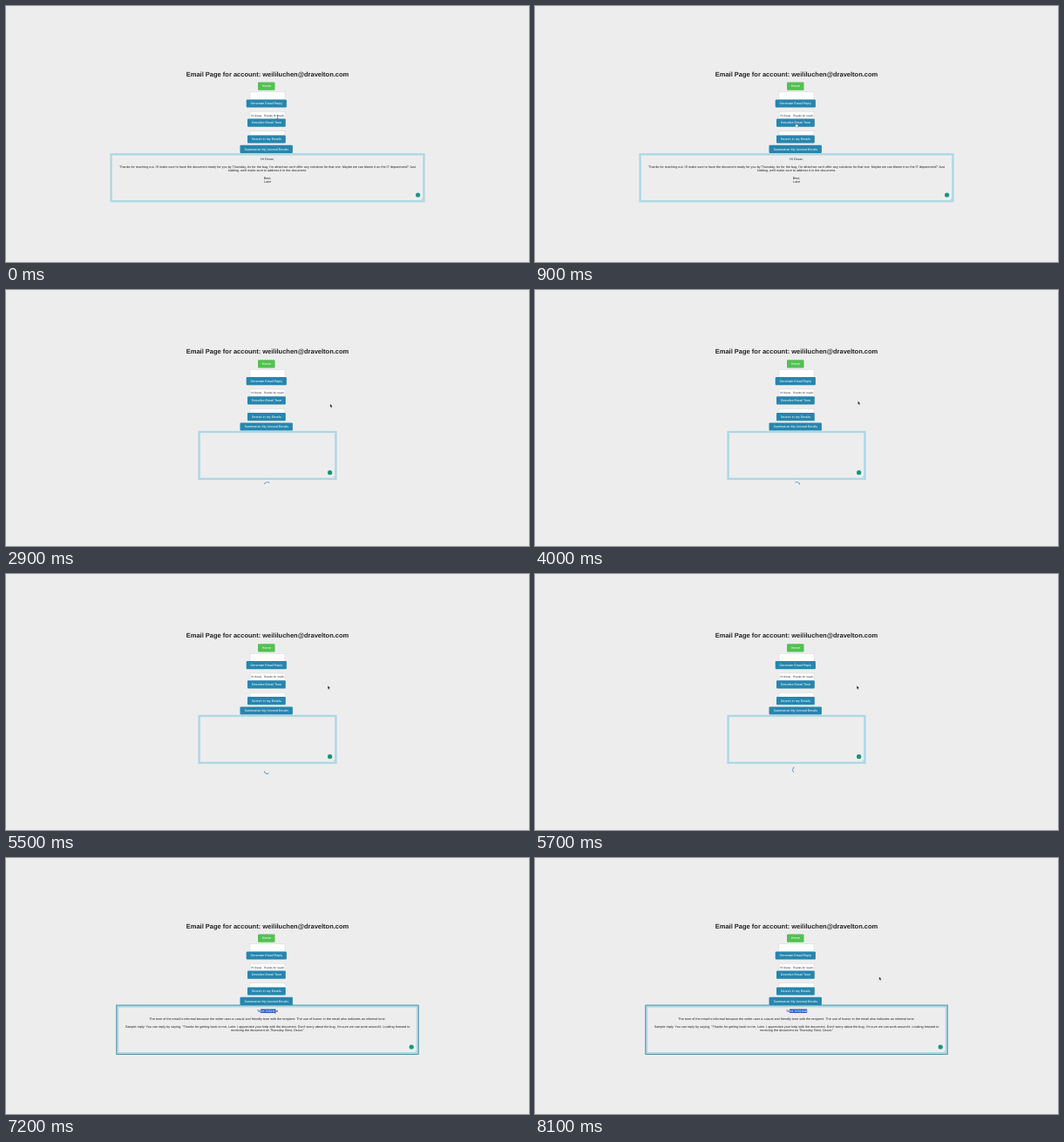
Animation, 600 px wide and 294 px high, one loop 8200 ms. Source, as an HTML page:

```html
<!DOCTYPE html>
<html lang="en">
<head>
<meta charset="utf-8">
<title>Email page</title>
<style>
  html, body { margin: 0; width: 100%; height: 100%; overflow: hidden; background: #eeedee; }
  svg { display: block; width: 100%; height: 100%; }
  text { font: 3.75px Arial, "Liberation Sans", sans-serif; text-anchor: middle; fill: #222;
         text-rendering: geometricPrecision; white-space: pre; }
  .title { font-size: 7.5px; font-weight: bold; }
  .label, .picked text { fill: #fff; }
  .typed { font-size: 3.125px; text-anchor: start; }
  .input { fill: #fff; stroke: #c4c4c4; stroke-width: .3; }
</style>
</head>
<body>
<svg viewBox="0 0 600 294">
  <defs>
    <clipPath id="pick"><rect id="range" x="291.9" y="173.5" width="0" height="4.5"/></clipPath>
  </defs>
  <g id="page">
    <text class="title" x="300" y="80.7">Email Page for account: weililuchen@dravelton.com</text>
    <g id="form"></g>
    <rect id="box" y="170.3" height="53.9" fill="none" stroke="#add8e3" stroke-width="2.4"/>
    <rect id="focus" y="169" height="56.4" fill="none" stroke="#2f819c" stroke-width=".8"/>
    <g id="corner">
      <circle cx="-8" cy="217" r="2.6" fill="#16967f"/>
      <path d="M-4 222.6l1.5-1.5M-3.1 222.6l.6-.6" stroke="#777" stroke-width=".3"/>
    </g>
    <g id="email"></g>
    <g id="tone"></g>
    <g class="picked" clip-path="url(#pick)">
      <rect x="280" y="170" width="40" height="10" fill="#2b62c4"/>
      <text x="300" y="177">Tone: Informal</text>
    </g>
  </g>
  <path id="spinner" d="M-3 -3A4.25 4.25 0 0 1 3 -3" fill="none" stroke="#3399bd" stroke-width="1"/>
  <g id="arrow"><path d="M0 0V3.9L.9 3.1L1.5 4.4L2.2 4.1L1.6 2.8H2.8Z" fill="#111" stroke="#fff" stroke-width=".25"/></g>
  <g id="beam"><path d="M-.8 -2H.8M0 -2V2M-.8 2H.8" fill="none" stroke="#333" stroke-width=".45"/></g>
  <g id="hand"><path d="M-.4 0Q0 -.5 .4 0V1.5L2 1.9Q2.5 2.1 2.4 2.8L2 4.3H-.3L-1.5 2.6Q-1.3 2 -.4 2.6Z" fill="#fff" stroke="#222" stroke-width=".3"/></g>
</svg>
<script>
const $ = id => document.getElementById(id);
const LOOP = 8200, STEP = 100, CLICK = 1200, REPLY = 6000, DRAG = 6900, DROP = 7300;

const input = (y, h) => `<rect class="input" x="280" y="${y}" width="40" height="${h}"/>`;
const button = (x, y, w, label, fill = "#2686ae") =>
  `<rect x="${x}" y="${y}" width="${w}" height="9.2" rx="1" fill="${fill}"/>
   <text class="label" x="${x + w / 2}" y="${y + 5.9}">${label}</text>`;
const lines = rows => rows.map((row, i) => `<text x="300" y="${177 + i * 4.38}">${row}</text>`).join("");

$("form").innerHTML =
  button(289, 87.5, 19.5, "Home", "#52c152") +
  input(98.8, 8.6) + button(275.7, 107.4, 46.2, "Generate Email Reply") +
  input(121.3, 8.2) + '<text class="typed" x="281.2" y="126.5">Hi Oscar,  Thanks for reach</text>' +
  button(277, 129.5, 43.8, "Describe Email Tone") +
  input(143.8, 5) + button(277, 148.4, 43.8, "Search in my Emails") +
  button(268.5, 159.7, 60.4, "Summarize My Unread Emails");

$("email").innerHTML = lines([
  "Hi Oscar,", "",
  "Thanks for reaching out. I'll make sure to have the document ready for you by Thursday. As for the bug, I'm afraid we can't offer any solutions for that one. Maybe we can blame it on the IT department? Just",
  "kidding, we'll make sure to address it in the document.", "",
  "Best,", "Luke"]);

$("tone").innerHTML = lines([
  "Tone: Informal", "",
  "The tone of the email is informal because the writer uses a casual and friendly tone with the recipient. The use of humor in the email also indicates an informal tone.", "",
  'Sample reply: You can reply by saying, "Thanks for getting back to me, Luke. I appreciate your help with the document. Don\'t worry about the bug, I\'m sure we can work around it. Looking forward to',
  'receiving the document on Thursday. Best, Oscar."']);

// time, x, y of the mouse
const path = [
  [0, 311.5, 127.5], [800, 299.5, 134.6], [1200, 299.5, 134.6], [1700, 368.6, 133.3],
  [2700, 372, 131], [3600, 371, 130], [4000, 370.5, 127.6], [4300, 374, 128.5],
  [4900, 370, 123.5], [5500, 369.2, 128.3], [6000, 369.2, 128.3], [6500, 295.5, 177.7],
  [6900, 292, 176.2], [7300, 312.2, 176.2], [7500, 312.2, 176.2], [8000, 394.8, 136.4], [8200, 394.8, 136.4]];

function mouse(t) {
  const i = path.findIndex(p => p[0] > t), [t0, x0, y0] = path[i - 1], [t1, x1, y1] = path[i];
  const u = (t - t0) / (t1 - t0), k = u * u * (3 - 2 * u);
  return [x0 + (x1 - x0) * k, y0 + (y1 - y0) * k];
}

const show = (id, on) => $(id).setAttribute("visibility", on ? "visible" : "hidden");
const move = (id, value) => $(id).setAttribute("transform", value);

function draw(t) {
  const loading = t >= CLICK && t < REPLY, done = t >= REPLY;
  const half = loading ? 79.6 : done ? 173.2 : 180.6;
  move("page", `translate(0 ${loading ? -7.3 : 0})`);
  for (const [id, inset] of [["box", 1.2], ["focus", 0]]) {
    $(id).setAttribute("x", 300 - half + inset);
    $(id).setAttribute("width", 2 * (half - inset));
  }
  move("corner", `translate(${300 + half} 0)`);
  show("email", t < CLICK);
  show("tone", done);
  show("focus", t >= DRAG);
  show("spinner", loading);
  move("spinner", `translate(300 225) rotate(${t * .36 + 22})`);

  const [x, y] = mouse(t);
  const end = t < DRAG ? 291.9 : t < DROP ? x : 312.2;
  $("range").setAttribute("width", Math.max(0, end - 291.9));
  const kind = t < 400 || (t >= 6300 && t < 7600) ? "beam" : t < CLICK ? "hand" : "arrow";
  for (const id of ["arrow", "beam", "hand"]) {
    show(id, id === kind);
    move(id, `translate(${x} ${y})`);
  }
}

const start = performance.now();
function tick() {
  const t = (performance.now() - start) % LOOP;
  draw(Math.floor(t / STEP) * STEP);
  requestAnimationFrame(tick);
}
tick();
</script>
</body>
</html>
```
